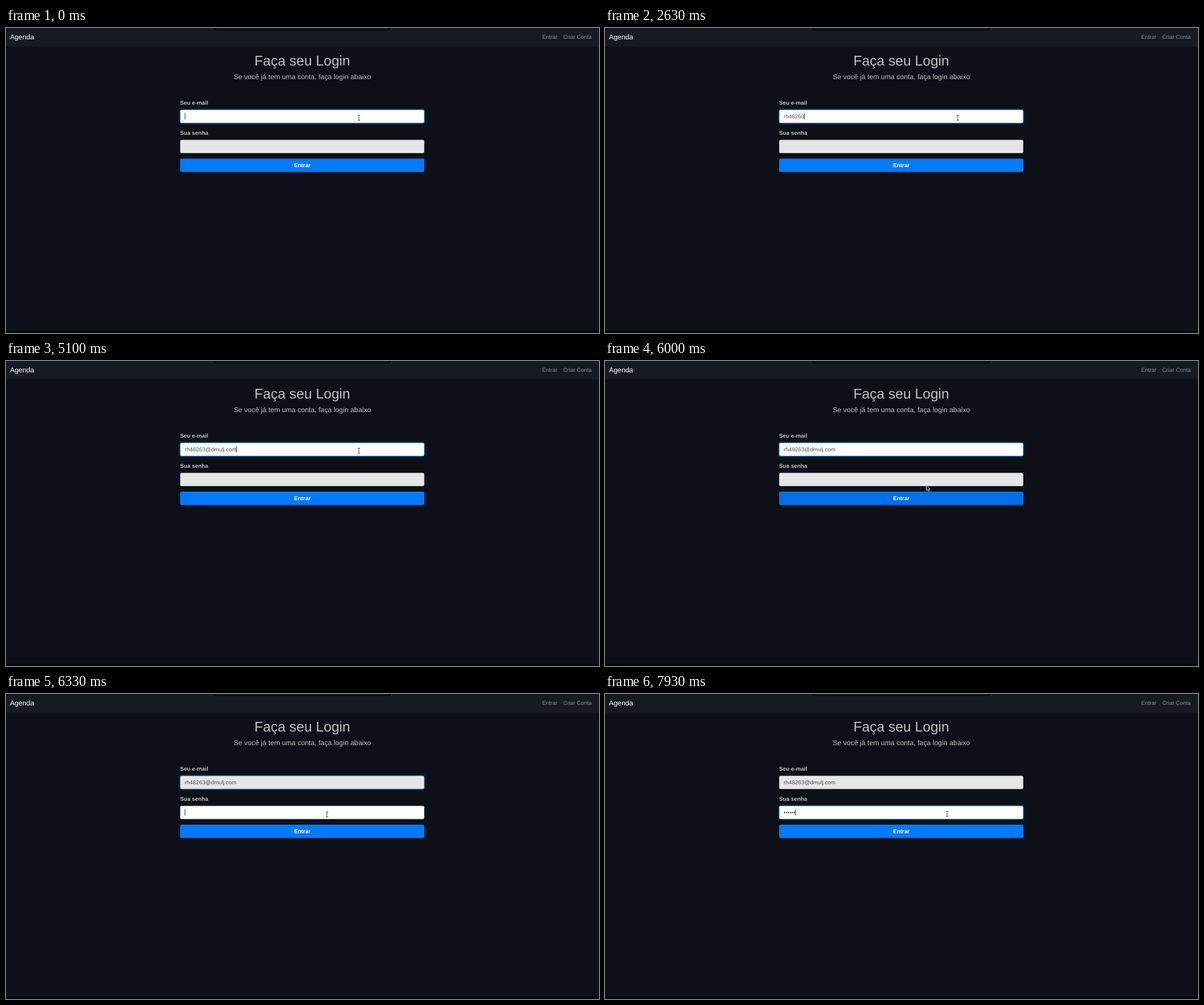
An HTML page that plays this animation: 1042 px wide and 537 px high, repeating every 8000 ms.

```html
<!DOCTYPE html>
<html lang="pt-BR">
<head>
<meta charset="utf-8">
<title>Login</title>
<style>
  html, body { margin: 0; width: 100%; height: 100%; overflow: hidden; background: #0d1117; }
  svg { display: block; width: 1042px; height: 537px; }
  text {
    font: 9.846px "Liberation Sans", Arial, sans-serif;
    text-rendering: geometricPrecision;
    white-space: pre;
    fill: #c1c1c1;
  }
  .bold { font-weight: 700; }
  .mid { text-anchor: middle; }
  .brand { font-size: 12.308px; fill: #fff; }
  .link { fill: #8a8d91; }
  .title { font-size: 24.615px; }
  .lead { font-size: 12.308px; }
  .value { fill: #495057; }
  .caret { fill: #33383d; }
  .glow { fill: #007bff; fill-opacity: .27; }
</style>
</head>
<body>
<svg viewBox="0 0 1042 537">
  <rect width="1042" height="537" fill="#0d1117"/>
  <rect width="1042" height="32.6" fill="#161b22"/>
  <rect x="364.5" y="-6" width="311.5" height="9.6" rx="3" fill="#07080b"/>
  <rect x="367" y="-6" width="306.5" height="7.4" rx="2" fill="#1d2026"/>
  <rect y="533" width="1042" height="4" fill="#08070b"/>

  <text class="brand" x="7" y="19.6">Agenda</text>
  <text class="link" x="942.3" y="18.7">Entrar</text>
  <text class="link" x="979" y="18.7">Criar Conta</text>

  <text class="title mid" x="520.6" y="65.5">Faça seu Login</text>
  <text class="lead mid" x="520.8" y="90.1">Se você já tem uma conta, faça login abaixo</text>
  <text class="bold" x="306" y="135.1">Seu e-mail</text>
  <text class="bold" x="306" y="188">Sua senha</text>

  <g id="fields"></g>

  <rect id="button" x="306" y="230" width="429" height="23.4" rx="2.5"/>
  <text class="bold mid" x="520.7" y="244.9" style="fill:#fff">Entrar</text>

  <g id="pointer">
    <g data-kind="beam" fill="none">
      <path d="M-2 -4.5H-.7L0 -4L.7 -4.5H2M0 -4V4M-2 4.5H-.7L0 4L.7 4.5H2" stroke="#3c3c3c" stroke-width="1"/>
    </g>
    <path data-kind="arrow" d="M0 0V9.6L2.2 7.6L3.8 11L5.4 10.3L3.9 7H6.8Z" fill="#15171a" stroke="#eee" stroke-width=".8"/>
    <path data-kind="hand" d="M-1 0Q0 -1 1 0V4L5 5Q6 5.4 5.8 7L5 11H-.6L-3.4 7Q-3 5.6 -1 7Z" fill="#fff" stroke="#15171a" stroke-width=".7"/>
  </g>
</svg>

<script>
const LOOP = 8000;
const EMAIL = "rh48263@dmulj.com";
const TEXT_X = 314.1;
const FOCUS_AT = 6300;

// [time, characters shown]
const emailSteps = [[0, 0], [470, 1], [670, 2], [1130, 3], [1330, 4], [1670, 5], [2230, 6],
  [2370, 7], [2830, 8], [3200, 9], [3600, 10], [3670, 11], [3870, 12], [4230, 13],
  [4770, 14], [4930, 16], [5100, 17]];
const passSteps = [[0, 0], [7170, 1], [7500, 2], [7600, 3], [7730, 5], [7930, 6]];

// [time, caret visible]
const caretSteps = [[0, 1], [330, 0], [470, 1], [5670, 0], [FOCUS_AT, 1], [6970, 0], [7170, 1]];

// [time, pointer x, y, kind, button hover]
const pointerSteps = [
  [0, 620, 158, "beam", 0],
  [5670, 604, 188, "arrow", 0],
  [5770, 580, 285, "arrow", 0],
  [5870, 566, 244, "hand", .7],
  [6000, 564.5, 218.6, "arrow", .6],
  [6100, 564, 212, "beam", .1],
  [6230, 564, 212, "beam", 0],
  [6570, 601, 211.3, "beam", 0]
];

// [time, share of the focus ring that has passed to the password field]
const ringSteps = [[0, 0], [FOCUS_AT, .08], [6430, 1]];

const SVG = "http://www.w3.org/2000/svg";
const at = (steps, t) => steps.findLast(s => s[0] <= t);
const mix = (a, b, k) =>
  `rgb(${a.map((v, i) => Math.round(v + (b[i] - v) * k)).join()})`;

function add(parent, tag, attrs) {
  const el = document.createElementNS(SVG, tag);
  for (const name in attrs) el.setAttribute(name, attrs[name]);
  return parent.appendChild(el);
}

function makeField(top, caretTop) {
  const g = document.getElementById("fields");
  const glow = add(g, "rect", { class: "glow", x: 304, y: top - 2, width: 433, height: 27.4, rx: 4.4 });
  const box = add(g, "rect", { x: 306.3, y: top + .3, width: 428.4, height: 22.8, rx: 2.2, "stroke-width": .62 });
  const text = add(g, "text", { class: "value", x: TEXT_X, y: top + 15.1 });
  const caret = add(g, "rect", { class: "caret", y: caretTop, width: 1, height: 11 });
  return (value, focused, ring, caretOn) => {
    glow.setAttribute("opacity", ring);
    box.setAttribute("fill", focused ? "#fff" : "#e6e6e6");
    box.setAttribute("stroke", mix([206, 212, 218], [128, 189, 255], ring));
    text.textContent = value;
    const end = value ? text.getComputedTextLength() : 0;
    caret.setAttribute("x", Math.floor(TEXT_X + end));
    caret.setAttribute("opacity", focused && caretOn ? 1 : 0);
  };
}

const drawEmail = makeField(144, 150);
const drawPass = makeField(196.9, 203);
const button = document.getElementById("button");
const pointer = document.getElementById("pointer");

function draw(t) {
  const onPass = t >= FOCUS_AT;
  const ring = at(ringSteps, t)[1];
  const caretOn = at(caretSteps, t)[1];
  drawEmail(EMAIL.slice(0, at(emailSteps, t)[1]), !onPass, 1 - ring, caretOn);
  drawPass("•".repeat(at(passSteps, t)[1]), onPass, ring, caretOn);

  const [, x, y, kind, hover] = at(pointerSteps, t);
  pointer.setAttribute("transform", `translate(${x} ${y})`);
  for (const shape of pointer.children)
    shape.setAttribute("visibility", shape.dataset.kind === kind ? "visible" : "hidden");
  button.setAttribute("fill", mix([0, 123, 255], [0, 105, 217], hover));
}

const start = performance.now();
function tick() {
  draw((performance.now() - start) % LOOP);
  requestAnimationFrame(tick);
}
tick();
</script>
</body>
</html>
```
